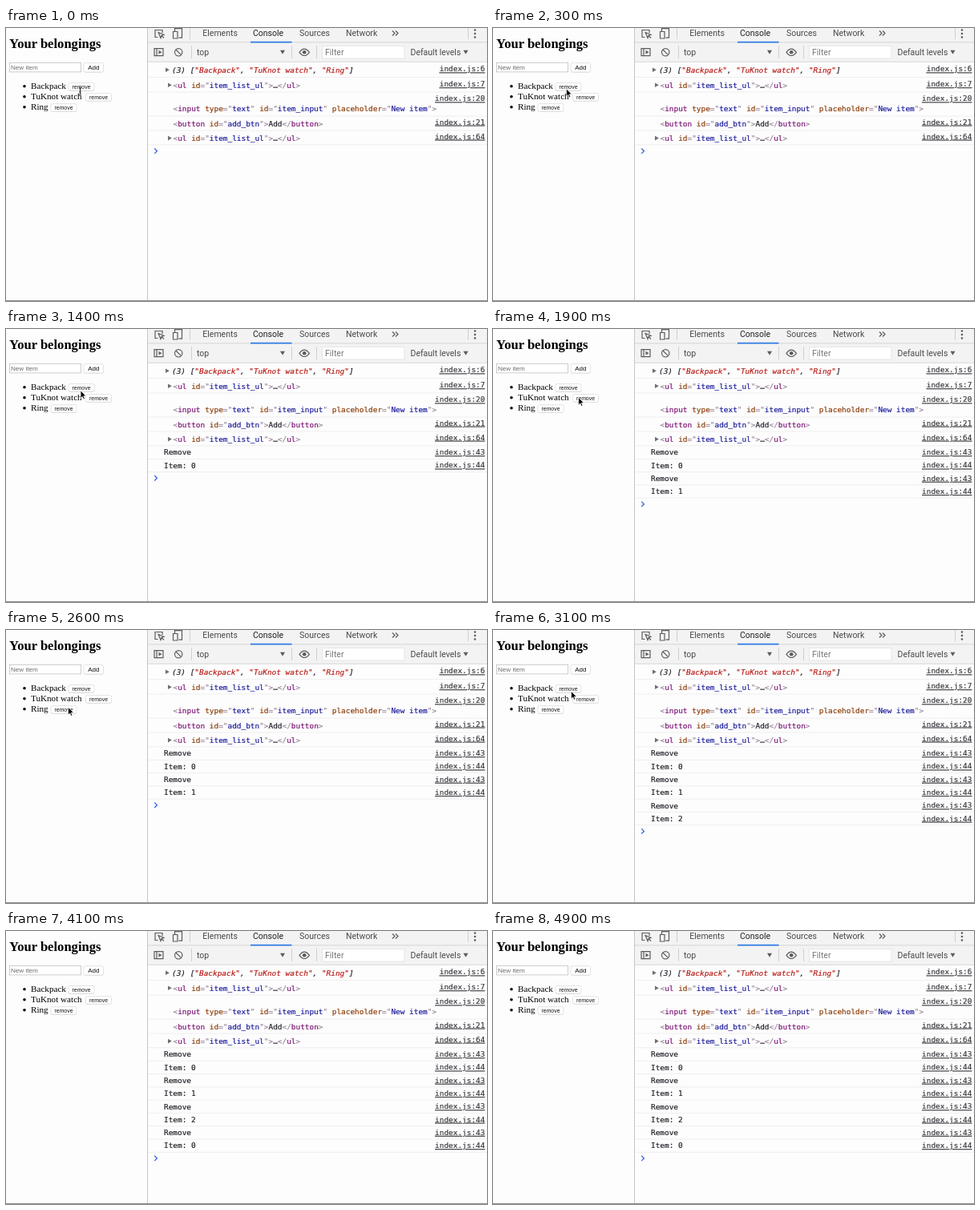
An HTML page for the animation above (5 s loop, 600x341 px).

```html
<!DOCTYPE html>
<html lang="en">
<head>
<meta charset="utf-8">
<title>Your belongings</title>
<style>
  html, body { margin: 0; width: 100%; height: 100%; overflow: hidden; background: #fdfdfd; }
  svg { display: block; width: 100%; height: 100%; }
  text { white-space: pre; }
  .page { font-family: "Liberation Serif", Times, serif; fill: #000; }
  .form { font-family: "Liberation Sans", Arial, sans-serif; }
  .ui { font-family: Roboto, Arial, sans-serif; font-size: 10.5px; fill: #4a4a4a; }
  .code { --ink: #202028; font-family: "DejaVu Sans Mono", Menlo, monospace; font-size: 9.42px; }
  .code, .code tspan { fill: var(--ink); stroke: var(--ink); stroke-width: .18; }
  .link { --ink: #38383e; text-decoration: underline; text-anchor: end; }
  .punct { --ink: #9a879a; }
  .tag { --ink: #7a1274; }
  .attr { --ink: #8a3c08; }
  .val { --ink: #1a1a9a; }
  .str { --ink: #b81814; }
  .icon { fill: none; stroke: #5c5c5c; stroke-width: 1.2; }
</style>
</head>
<body>
<svg id="stage" viewBox="0 0 600 341" xmlns="http://www.w3.org/2000/svg"></svg>
<script>
const LOOP = 5000, STEP = 100;
const stage = document.getElementById('stage');
const items = ['Backpack', 'TuKnot watch', 'Ring'];

const text = (x, y, cls, body, extra = '') => `<text x="${x}" y="${y}" class="${cls}" ${extra}>${body}</text>`;
const span = (cls, body) => `<tspan class="${cls}">${body}</tspan>`;
const rect = (x, y, w, h, fill, extra = '') => `<rect x="${x}" y="${y}" width="${w}" height="${h}" fill="${fill}" ${extra}/>`;
const path = (d, extra) => `<path d="${d}" ${extra}/>`;
const box = (x, y, w, h, stroke, r) => rect(x, y, w, h, '#fff', `rx="${r}" stroke="${stroke}" stroke-width=".8"`);
const rule = y => rect(177, y, 423, 1, '#efefef');
const divider = (x, y, h) => rect(x, y, 1, h, '#cfcfcf');
const link = (y, line) => text(597.4, y, 'code link', 'index.js:' + line);

const button = (x, y, w, h, label, size) =>
  rect(x, y + .6, w, h, '#d2d2d2', 'rx="2"') + box(x, y, w, h, '#dedede', 2) +
  text(x + w / 2, y + h / 2 + size * .34, 'form', label, `font-size="${size}" text-anchor="middle" fill="#111"`);

// Markup as the inspector colours it
const quote = v => span('punct', '="') + span('val', v) + span('punct', '"');
const open = (name, attrs) => span('punct', '&lt;') + span('tag', name) +
  attrs.map(([k, v]) => ' ' + span('attr', k) + quote(v)).join('') + span('punct', '&gt;');
const close = name => span('punct', '&lt;/') + span('tag', name) + span('punct', '&gt;');

function pageView() {
  const rows = [[78, 72.7], [99.5, 85.8], [56, 98.8]];
  return text(4, 25, 'page', 'Your belongings', 'font-size="16.6" font-weight="700"') +
    box(4.5, 43.3, 89, 11.6, '#c0c0c0', 0) +
    text(6, 52.2, 'form', 'New item', 'font-size="8.1" fill="#6c6c6c"') +
    button(97, 43.6, 24.5, 11.4, 'Add', 8) +
    items.map((name, i) => {
      const [x, y] = rows[i];
      return `<circle cx="23" cy="${y}" r="1.8"/>` +
        text(31, y + 3.2, 'page', name, 'font-size="11.15"') +
        button(x, y - 4.2, 32, 9.6, 'remove', 6.9);
    }).join('');
}

function toolbar() {
  const tabs = [['Elements', 245.3], ['Console', 308], ['Sources', 366], ['Network', 424]];
  const down = (x, y) => path(`M${x} ${y}h6l-3 5z`, 'fill="#5c5c5c"');
  return rect(177, 0, 423, 42, '#f3f3f3') + rect(177, 17.5, 423, .8, '#cdcdcd') +
    rect(177, 41.8, 423, .8, '#cdcdcd') + rect(305, 16.8, 51.5, 1.7, '#2c7be5') +
    tabs.map(([name, x]) => text(x, 10.3, 'ui', name, name === 'Console' ? 'style="fill:#222"' : '')).join('') +
    path('M195 6V2.5h-9v9h3.5M190 5.5l7 3-3 1-1 3zM194 9.5l3 3', 'class="icon"') +
    path('M210.5 4V.6h9v11.5h-4M208.5 4.5h5.5v8.5h-5.5z', 'class="icon"') +
    path('M482 3.5l3 3-3 3M486 3.5l3 3-3 3', 'class="icon"') +
    [2.5, 7, 11.5].map(y => `<circle cx="585" cy="${y}" r="1.3" fill="#5c5c5c"/>`).join('') +
    divider(229, 0, 14) + divider(576, 0, 14) +
    path('M185 25.7h11v9h-11zM188 25.7v9', 'class="icon"') + path('M190.5 27.8l4 2.4-4 2.4z', 'fill="#5c5c5c"') +
    path('M210.5 30.3a4.7 4.7 0 1 0 9.4 0a4.7 4.7 0 1 0-9.4 0M211.9 27l6.6 6.6', 'class="icon"') +
    divider(231, 22, 16) + text(238, 33.8, 'ui', 'top', 'font-size="11"') + down(342, 27.7) +
    divider(356, 22, 16) + divider(387, 22, 16) +
    path('M366 30.3q6-8.4 12.4 0q-6.2 8.4-12.4 0z', 'class="icon"') +
    '<circle cx="372.2" cy="30.3" r="2.3" fill="#5c5c5c"/>' +
    box(394.5, 22.5, 102.5, 15.5, '#e2e2e2', 0) + text(398, 34, 'ui', 'Filter', 'style="fill:#777"') +
    text(504.5, 33.8, 'ui', 'Default levels') + down(570.5, 27.7);
}

function consoleBase() {
  const fold = (x, y) => path(`M${x} ${y - 2.8}l4.8 2.8-4.8 2.8z`, 'fill="#6e6e6e"');
  const list = open('ul', [['id', 'item_list_ul']]) + '…' + close('ul');
  const array = '(3) [' + items.map(s => span('str', `"${s}"`)).join(', ') + ']';
  const field = open('input', [['type', 'text'], ['id', 'item_input'], ['placeholder', 'New item']]);
  return fold(199, 52.3) + text(207, 55.7, 'code', array, 'font-style="italic"') + link(54.4, 6) +
    fold(202, 71.2) + text(208.5, 74.5, 'code', list) + link(73.2, 7) +
    link(91.4, 20) + text(208.5, 104, 'code', field) +
    text(208.5, 122.5, 'code', open('button', [['id', 'add_btn']]) + 'Add' + close('button')) + link(120.6, 21) +
    fold(202, 137.6) + text(208.5, 140.9, 'code', list) + link(138.6, 64) +
    [61, 79.5, 109.5, 127.5, 145.3].map(rule).join('');
}

// Console output of each click on a remove button
const clicks = [[400, 0], [1900, 1], [2800, 2], [3400, 0]];
const ROW = 16.28;

function logView(t) {
  const lines = clicks.filter(([at]) => t >= at)
    .flatMap(([, item]) => [['Remove', 43], ['Item: ' + item, 44]]);
  const end = 153.7 + lines.length * ROW;
  return lines.map(([label, line], i) => {
    const y = 154 + i * ROW;
    return text(197, y + 3.4, 'code', label) + link(y + 3.2, line) + rule(y + 7.8);
  }).join('') + path(`M185.2 ${end - 3.2}l3.2 3.2-3.2 3.2`, 'fill="none" stroke="#3a66dc" stroke-width="1.3"');
}

// Time, then pointer tip
const route = [[0, 91.5, 76], [1300, 91.5, 76], [1800, 106.5, 85.5], [2100, 106.5, 85.5], [2500, 77.5, 96.5],
  [2800, 77.5, 96.5], [3100, 97.5, 76.5], [3500, 97.5, 76.5], [3900, 120, -16]];

function pointerAt(t) {
  const i = route.findIndex(p => p[0] > t);
  if (i < 0) return route[route.length - 1].slice(1);
  const [t0, x0, y0] = route[i - 1], [t1, x1, y1] = route[i];
  const k = (t - t0) / (t1 - t0), e = k * k * (3 - 2 * k);
  return [x0 + (x1 - x0) * e, y0 + (y1 - y0) * e];
}

function pointer(t) {
  if (t < 200) return path('M91 74.2q1.5 0 1.5 1v7q0 1-1.5 1M94 74.2q-1.5 0-1.5 1v7q0 1 1.5 1M91.3 79.8h2.4',
    'fill="none" stroke="#222" stroke-width=".9"');
  const [x, y] = pointerAt(t);
  return path('M0 0v9.4l2.2-2 1.5 3.4 1.6-.7-1.5-3.3h3z',
    `transform="translate(${x} ${y})" fill="#000" stroke="#fff" stroke-width=".7"`);
}

stage.innerHTML = rect(0, 0, 600, 341, '#fdfdfd') + pageView() + toolbar() + consoleBase() +
  rect(176, 0, 1, 341, '#c6c6c6') + rect(0, 340, 600, 1, '#8c8c8c') +
  '<g id="log"></g><g id="pointer"></g>';
const log = document.getElementById('log');
const cursor = document.getElementById('pointer');
let shown = -1;

function draw(now) {
  const t = Math.floor(now % LOOP / STEP) * STEP;
  if (t !== shown) {
    log.innerHTML = logView(t);
    cursor.innerHTML = pointer(t);
    shown = t;
  }
}

const start = performance.now();
function tick() {
  draw(performance.now() - start);
  requestAnimationFrame(tick);
}
tick();
</script>
</body>
</html>
```
